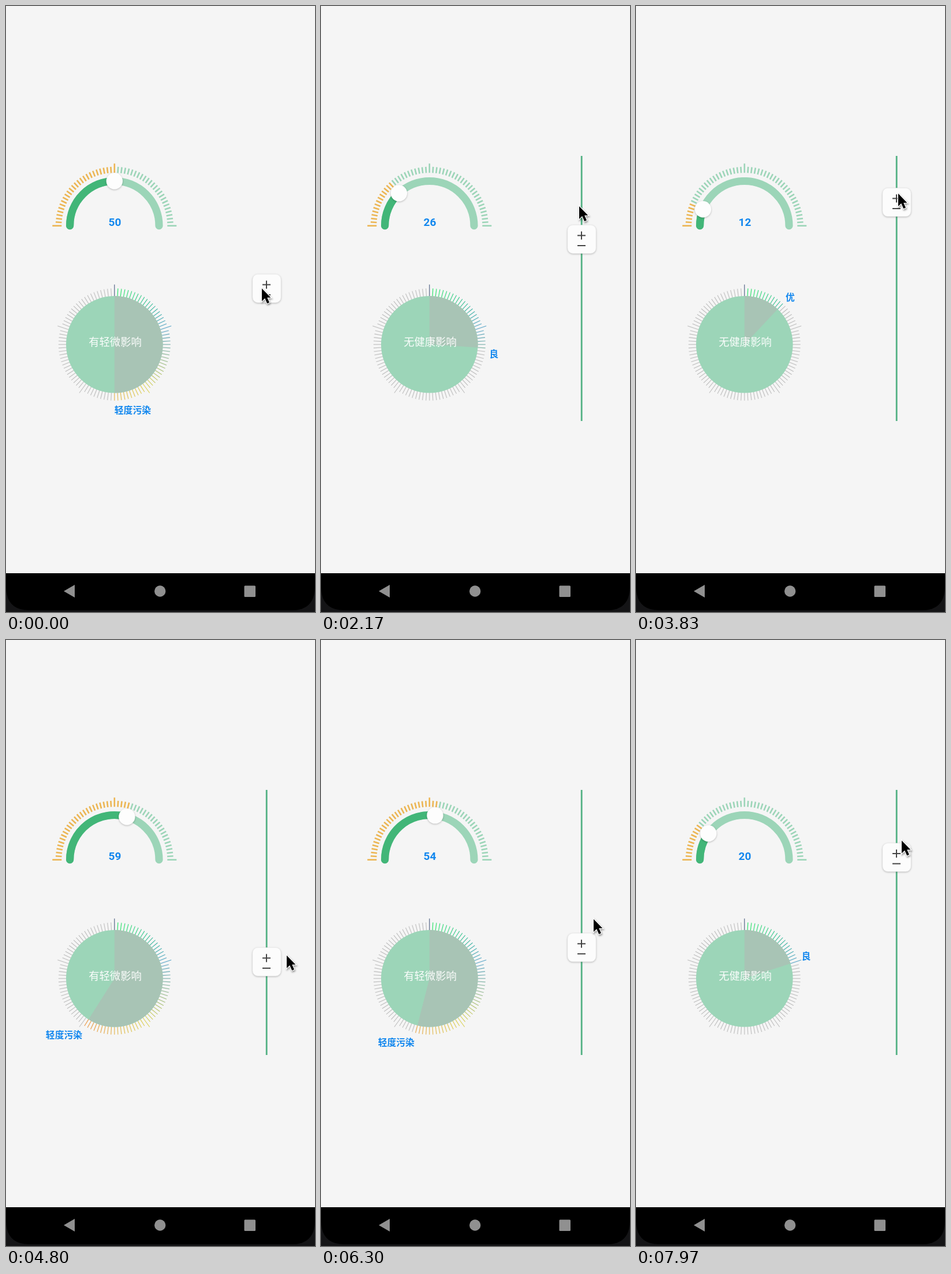
Animation, 535 px wide and 1047 px high, one loop 8 s. Source, as an HTML page:

```html
<!DOCTYPE html>
<html lang="zh-CN">
<head>
<meta charset="utf-8">
<title>Gauge and dial</title>
<style>
html, body { margin: 0; width: 100%; height: 100%; overflow: hidden; background: #f5f5f5; }
svg { display: block; width: 535px; height: 1047px; }
text { font-family: "Noto Sans CJK SC", "Noto Sans CJK", "Noto Sans", sans-serif; }
#number { font: 700 19px Roboto, sans-serif; fill: #1287ee; text-anchor: middle; }
#effect { font-size: 18.3px; fill: #fff; fill-opacity: .95; text-anchor: middle; }
#level { font-size: 15.8px; font-weight: 700; fill: #1287ee; }
#knob, #handle rect { filter: drop-shadow(0 1px 1.5px rgba(0, 0, 0, .25)); }
#pointer { filter: drop-shadow(1px 2px 1.5px rgba(0, 0, 0, .4)); }
</style>
</head>
<body>
<svg viewBox="0 0 535 1047">
  <rect width="535" height="1047" fill="#f5f5f5"/>

  <g id="gaugeTicks" stroke-width="2.6"></g>
  <g fill="none" stroke-width="13.2" stroke-linecap="round">
    <path id="track" stroke="#9cd5b8"/>
    <path id="arc" stroke="#42b678"/>
  </g>
  <circle id="knob" r="14.2" fill="#fdfdfd"/>
  <text id="number" x="188.5" y="380"></text>

  <g id="dialTicks" stroke-width="1.1"></g>
  <circle id="disc" fill="#9cd5b8"/>
  <path id="pie" fill="#a8c4b5"/>
  <text id="effect" x="189" y="586.8"></text>
  <text id="level"></text>

  <path id="rail" d="M451.2 259V717" stroke="#52b183" stroke-width="2.8"/>
  <g id="handle">
    <rect x="-24" y="-24.5" width="49" height="49" rx="9" fill="#fcfcfc" stroke="#ececec" stroke-width=".6"/>
    <path d="M-7 -6.5H7M0 -13.5V.5M-7 11H7" stroke="#444" stroke-width="2"/>
  </g>

  <rect y="980" width="535" height="67" fill="#141416"/>
  <path d="M0 980H535V1006Q533 1044 495 1044H40Q2 1044 0 1006Z"/>
  <g fill="#909090">
    <path d="M100 1011L119 1000V1022Z"/>
    <circle cx="266.7" cy="1011" r="9.7"/>
    <rect x="412.5" y="1001.5" width="19.5" height="19.5" rx="1.5"/>
  </g>

  <path id="pointer" d="M0 1V23L5.2 18L9.2 27L13 25.3L9.2 16.8H15.4Z"
        stroke="#fff" stroke-width="2.4" paint-order="stroke"/>
</svg>
<script>
const LOOP = 8000, FRAMES = 240, DRAG_START = 1700;
const CX = 187.8, GAUGE_Y = 379.7, DIAL_Y = 584.8;
const GAUGE_R = 77.2, DISC_R = 83.8;
const $ = id => document.getElementById(id);

// Places where the drag rests or turns: [time, value]
const drag = [
  [DRAG_START, 44.6], [2754, 0], [3150, 25], [3544, 0], [4600, 71.3], [4800, 59.5],
  [5670, 86.3], [6300, 54.1], [6740, 14], [7380, 54], [7800, 5], [7970, 20.1]
];
// Pointer: [time, x, height relative to the handle]
const hand = [
  [0, 443, -1], [1000, 449, -10], [DRAG_START, 448, -12], [2170, 447, -58], [3830, 454, -16],
  [4800, 486, -12], [5670, 495, -23], [6300, 472, -50], [7970, 460, -30]
];
// One hue at every fifth of the dial
const hues = [[34, 230, 94], [86, 163, 198], [217, 208, 80], [234, 147, 64], [214, 72, 63], [194, 54, 54]];
const levels = [
  ["优", "无健康影响"], ["良", "无健康影响"], ["轻度污染", "有轻微影响"],
  ["中度污染", "危害健康"], ["重度污染", "严重危害健康"]
];

const lerp = (a, b, u) => a + (b - a) * u;

// Sine easing from one key to the next
function sample(keys, t, col = 1) {
  const next = keys.findIndex(k => k[0] > t);
  if (next < 0) return keys[keys.length - 1][col];
  if (next === 0) return keys[0][col];
  const a = keys[next - 1], b = keys[next];
  const u = (t - a[0]) / (b[0] - a[0]);
  return lerp(a[col], b[col], (1 - Math.cos(Math.PI * u)) / 2);
}

function hueAt(value) {
  const i = Math.floor(value / 20), u = value / 20 - i;
  return `rgb(${hues[i].map((c, k) => Math.round(lerp(c, hues[i + 1][k], u)))})`;
}

// Degrees run clockwise from twelve o'clock
function polar(cy, r, deg) {
  const a = deg * Math.PI / 180;
  return [CX + r * Math.sin(a), cy - r * Math.cos(a)];
}

const set = (id, attrs) => {
  for (const key in attrs) $(id).setAttribute(key, attrs[key]);
};

function addTicks(id, count, cy, r0, outer, from) {
  return Array.from({ length: count }, (_, i) => {
    const line = document.createElementNS("http://www.w3.org/2000/svg", "path");
    const deg = from + i * 3.6;
    line.setAttribute("d", `M${polar(cy, r0, deg)}L${polar(cy, outer(i), deg)}`);
    $(id).append(line);
    return line;
  });
}

const gaugeTicks = addTicks("gaugeTicks", 51, GAUGE_Y, 91.5, i => i % 25 ? 102 : 107.5, -90);
const dialTicks = addTicks("dialTicks", 100, DIAL_Y, 83, i => i % 20 ? 97 : 103.5, 0);

const gaugeArc = deg =>
  `M${polar(GAUGE_Y, GAUGE_R, -90)}A${GAUGE_R} ${GAUGE_R} 0 0 1 ${polar(GAUGE_Y, GAUGE_R, deg)}`;
set("track", { d: gaugeArc(90) });
set("disc", { cx: CX, cy: DIAL_Y, r: DISC_R });

function drawGauge(v) {
  const deg = v * 1.8 - 90, [cx, cy] = polar(GAUGE_Y, GAUGE_R, deg);
  gaugeTicks.forEach((line, i) => line.setAttribute("stroke", i * 2 <= v ? "#ecb552" : "#9cd5b8"));
  set("arc", { d: gaugeArc(deg) });
  set("knob", { cx, cy });
  $("number").textContent = v;
}

function drawDial(v) {
  const deg = v * 3.6, [x, y] = polar(DIAL_Y, 104, deg);
  dialTicks.forEach((line, i) =>
    line.setAttribute("stroke", i === 0 ? "#46587c" : i <= v ? hueAt(i) : "#bdbdbd"));
  set("pie", {
    d: `M${CX} ${DIAL_Y}v${-DISC_R}A${DISC_R} ${DISC_R} 0 ${+(deg > 180)} 1 ${polar(DIAL_Y, DISC_R, deg)}Z`
  });
  const [level, effect] = levels[Math.min(4, Math.floor(v / 20))];
  $("effect").textContent = effect;
  $("level").textContent = level;
  set("level", { x, y: y + (y > DIAL_Y ? 15.4 : -0.3), "text-anchor": v > 50 ? "end" : "start" });
}

function draw(t) {
  const dragging = t >= DRAG_START;
  // Taps on the plus sign count up before the drag begins
  const value = dragging ? sample(drag, t) : 50 + Math.min(5, t / 155) + (t > 1200);
  const v = Math.floor(value + 1e-6);
  drawGauge(v);
  drawDial(v);

  const y = dragging ? 283.5 + 4.58 * value : 488;
  set("rail", { visibility: dragging ? "visible" : "hidden" });
  set("handle", { transform: `translate(451 ${y})` });
  set("pointer", { transform: `translate(${sample(hand, t)} ${y + sample(hand, t, 2)})` });
}

const start = performance.now();
function tick() {
  const t = (performance.now() - start) % LOOP;
  const step = Math.floor((t + 3.4) * FRAMES / LOOP) % FRAMES;
  draw(Math.round(step * LOOP / FRAMES / 10) * 10);
  requestAnimationFrame(tick);
}
tick();
</script>
</body>
</html>
```
